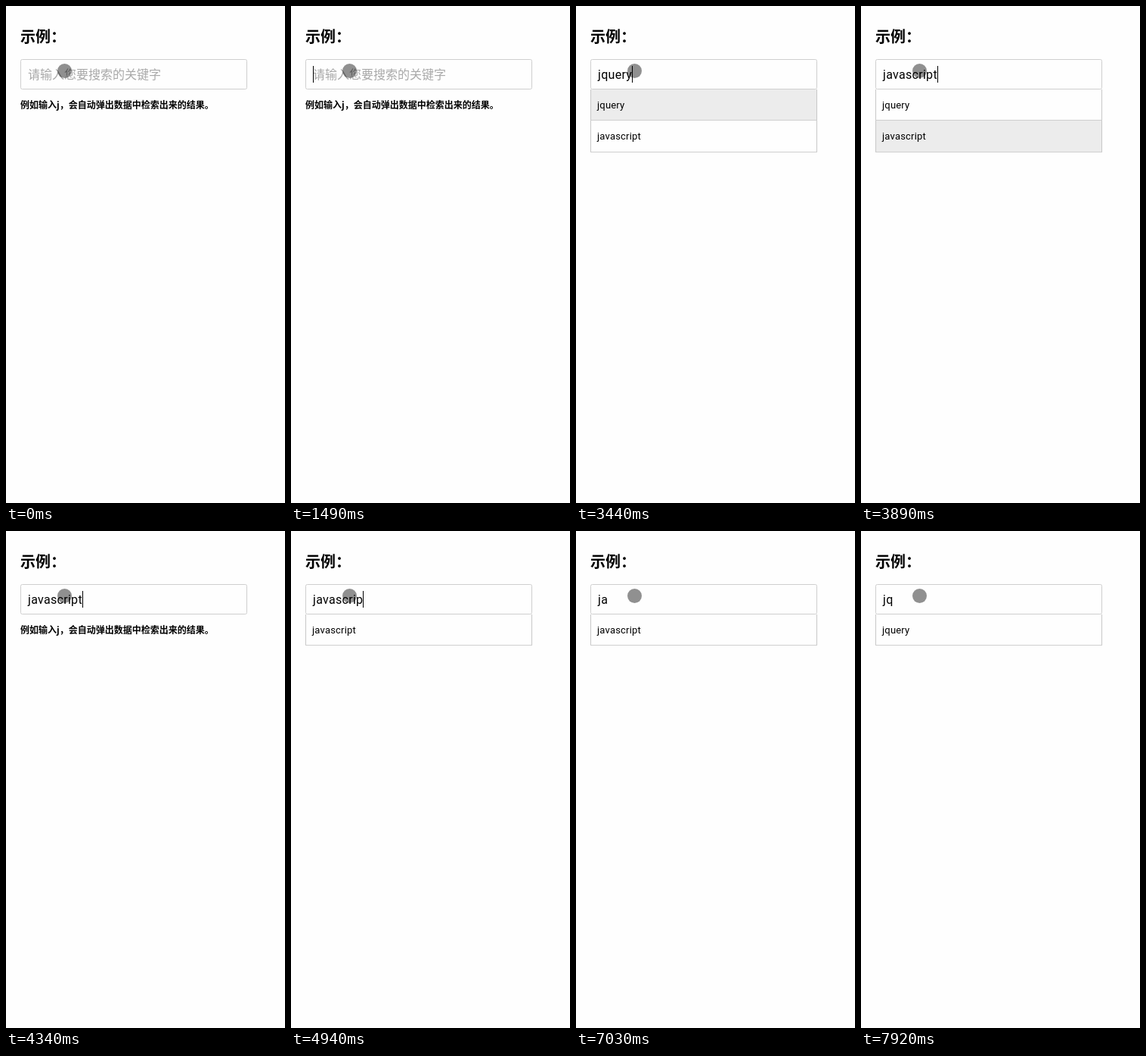
An HTML page with a canvas for the animation above (8000 ms loop, 369 by 655 pixels).

```html
<!DOCTYPE html>
<html lang="zh-CN">
<head>
<meta charset="utf-8">
<title>示例</title>
<style>
html, body { margin: 0; width: 100%; height: 100%; overflow: hidden; background: #fefefe; }
canvas { display: block; width: 369px; height: 655px; }
</style>
</head>
<body>
<canvas id="stage" width="369" height="655"></canvas>
<script>
const ctx = document.getElementById('stage').getContext('2d');
const LOOP = 8000;
const CJK = '"Noto Sans CJK SC", "Noto Sans CJK", sans-serif';
const LATIN = 'Roboto, sans-serif';
const BOTH = ['jquery', 'javascript'];
const QUERY = ['jquery'];
const SCRIPT = ['javascript'];

// [start ms, input text, caret x (0 = hidden), suggestions, selected row]
const steps = [
  [0, '', 0, []],
  [600, '', 29, []],
  [1050, '', 0, []],
  [1490, '', 29, []],
  [1940, 'j', 33, BOTH],
  [2390, 'j', 0, BOTH],
  [2840, 'j', 33, BOTH],
  [3440, 'jquery', 74, BOTH, 0],
  [3890, 'javascript', 101, BOTH, 1],
  [4340, 'javascript', 101, []],
  [4940, 'javascrip', 95, SCRIPT],
  [5090, 'javascri', 86, SCRIPT],
  [5390, 'javascr', 82, SCRIPT],
  [5540, 'javasc', 76, SCRIPT],
  [5690, 'javas', 67, SCRIPT],
  [5840, 'java', 59, SCRIPT],
  [6140, 'jav', 50, SCRIPT],
  [6580, 'ja', 42, SCRIPT],
  [7030, 'ja', 0, SCRIPT],
  [7170, 'j', 33, BOTH],
  [7320, 'jq', 43, QUERY],
  [7920, 'jq', 0, QUERY]
];

function rect(x, y, w, h, color) {
  ctx.fillStyle = color;
  ctx.fillRect(x, y, w, h);
}

function text(str, x, y, font, color = '#000', spacing = 0) {
  ctx.font = font;
  ctx.letterSpacing = spacing + 'px';
  ctx.fillStyle = color;
  ctx.fillText(str, x, y);
}

function drawInput(value, caret) {
  ctx.strokeStyle = '#cfcfcf';
  ctx.lineWidth = 1;
  ctx.beginPath();
  ctx.roundRect(19.5, 70.5, 299, 39, 2);
  ctx.stroke();
  if (value) text(value, 29, 96, '16px ' + LATIN, '#000', 0.3);
  else text('请输入您要搜索的关键字', 29, 96, '16px ' + CJK, '#a9a9a9');
  if (caret) rect(caret, 79, 1, 22, '#000');
}

function drawList(items, selected) {
  items.forEach((item, i) => {
    const top = i ? 151 : 110;
    const bottom = i ? 192 : 150;
    if (i === selected) rect(20, top, 298, bottom - top, '#ececec');
    rect(19, top, 1, bottom - top + 1, '#c8c8c8');
    rect(318, top, 1, bottom - top + 1, '#c8c8c8');
    rect(19, bottom, 300, 1, '#cfcfcf');
    text(item, 28, 135 + i * 41, '13px ' + LATIN, '#000', 0.2);
  });
}

function draw(now) {
  const time = now % LOOP;
  const [, value, caret, items, selected] = steps.findLast(step => step[0] <= time);
  rect(0, 0, 369, 655, '#fefefe');
  text('示例：', 19, 48, 'bold 20px ' + CJK);
  drawInput(value, caret);
  if (items.length) drawList(items, selected);
  else text('例如输入j，会自动弹出数据中检索出来的结果。', 19, 135, 'bold 12px ' + CJK);

  ctx.fillStyle = 'rgba(0, 0, 0, 0.43)';
  ctx.beginPath();
  ctx.arc(77.5, 85.5, 9.5, 0, Math.PI * 2);
  ctx.fill();
}

const start = performance.now();
function tick() {
  draw(performance.now() - start);
  requestAnimationFrame(tick);
}
tick();
</script>
</body>
</html>
```
